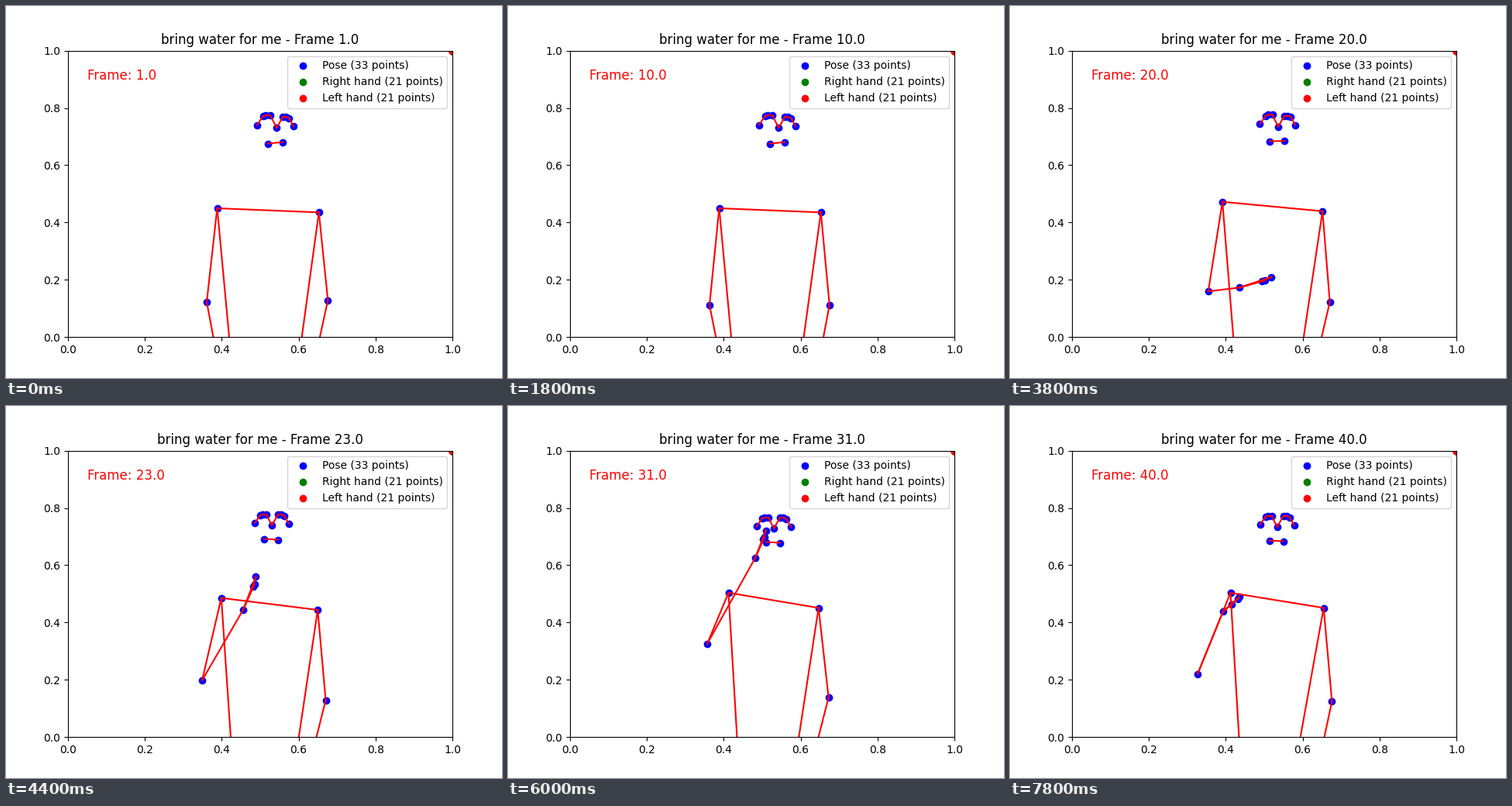
A matplotlib script that plays this animation: 640x480 px, repeating every 8000 ms.

```python
import numpy as np
import matplotlib.pyplot as plt
from matplotlib.animation import FuncAnimation

COUNT, STEP = 40, 200
LEFT, FLOOR, WIDTH, HEIGHT = 80, 427.2, 496, 369.6  # axes box in pixels

# Key points of the lifting arm, in pixels
KEYS = [1, 10, 17, 23, 31, 36, 40]
ELBOW = np.array([(259, 382), (260, 386), (259, 379), (253, 354),
                  (257, 307), (249, 342), (242, 346)], float)
WRIST = np.array([(276, 472), (277, 471), (286, 458), (306, 263),
                  (319, 196), (314, 228), (275, 265)], float)

# Ear, eye, nose, eye, ear and mouth corners, relative to the nose
FACE = np.array([(-22, -3), (-15, -13), (-12, -14), (-7, -14), (0, 0), (8, -14),
                 (12, -14), (16, -12.5), (22, -2), (-10, 17.5), (8, 18.5)])

# Point order: face 0-10, shoulders 11-12, elbows 13-14, right wrist 15,
# right fingers 16-18, left wrist 19, hips 20-21
LINKS = [(i, i + 1) for i in range(8)] + [
    (9, 10), (11, 12), (11, 13), (13, 15), (15, 16), (15, 17), (15, 18),
    (16, 17), (12, 14), (14, 19), (11, 20), (12, 21), (20, 21),
]


def ease(t, start, end):
    u = np.clip((t - start) / (end - start), 0, 1)
    return u * u * (3 - 2 * u)


def wave(t, start, period):
    return np.cos(2 * np.pi * (t - start) / period)


def follow(track, t):
    """Smooth curve through the key points."""
    slopes = np.gradient(track, KEYS, axis=0)
    i = min(np.searchsorted(KEYS, t, side="right") - 1, len(KEYS) - 2)
    gap = KEYS[i + 1] - KEYS[i]
    u = (t - KEYS[i]) / gap
    blend = ease(u, 0, 1)
    bend = gap * u * (1 - u) * (slopes[i] * (1 - u) - slopes[i + 1] * u)
    return track[i] + (track[i + 1] - track[i]) * blend + bend


def extend(joint, cross_x):
    """Continue a limb past the point where it crosses the floor."""
    return joint + 1.5 * (np.array([cross_x, FLOOR]) - joint)


def head(t):
    turn = 1 - ease(t, 17, 23)
    nose = np.array([343 + 6.2 * turn + 1.7 * ease(t, 30, 40),
                     154 + 3.2 * turn + 4 * ease(t, 23, 31) - 2 * ease(t, 31, 36)])
    stretch = np.where(FACE[:, :1] < 0, 1 + 0.16 * turn, 1)
    return nose + FACE * stretch


def fingers(t):
    """Pinky, index and thumb fanned out from the wrist."""
    curl = ease(t, 36, 40)
    angle = np.radians(-75 + 144 * ease(t, 17, 22) - 27 * curl - np.array([2, 0, 3]))
    reach = 42 + 4 * wave(t, 23, 16) - 18 * curl
    sizes = reach * np.array([0.7 + 0.2 * curl, 1, 0.78 - 0.25 * curl])
    return np.column_stack([sizes * np.cos(angle), -sizes * np.sin(angle)])


def pose(t):
    r_shoulder = np.array([272.5 + 12 * ease(t, 17, 30), 261 - 20 * ease(t, 12, 30)])
    l_shoulder = np.array([403.7 - 3 * ease(t, 17, 29) + 4 * ease(t, 31, 40),
                           266.3 - 5.8 * ease(t, 15, 30)])
    l_elbow = np.array([414 + 1.5 * wave(t, 4, 38), 381 + 5 * wave(t, 12, 37)])
    wrist = follow(WRIST, t)
    points = np.vstack([
        head(t), r_shoulder, l_shoulder, follow(ELBOW, t), l_elbow,
        wrist, wrist + fingers(t),
        extend(l_elbow, 403.5 + 3.7 * wave(t, 8, 38)),
        extend(r_shoulder, 288 + 7.5 * ease(t, 19, 31)),
        extend(l_shoulder, 381.7 - 7 * ease(t, 8, 36)),
    ])
    return np.column_stack([(points[:, 0] - LEFT) / WIDTH,
                            (FLOOR - points[:, 1]) / HEIGHT])


fig, ax = plt.subplots(figsize=(6.4, 4.8), dpi=100)
ax.set_xlim(0, 1)
ax.set_ylim(0, 1)
body = ax.scatter([], [], c="blue", label="Pose (33 points)")
corner = np.ones(21)
ax.scatter(corner, corner, c="green", label="Right hand (21 points)")
ax.scatter(corner, corner, c="red", label="Left hand (21 points)")
lines = [ax.plot([], [], "r-")[0] for _ in LINKS]
label = ax.text(0.05, 0.9, "", fontsize=12, color="red")
title = ax.set_title("")
ax.legend(loc="upper right")


def draw(frame):
    n = frame + 1.0
    points = pose(n)
    body.set_offsets(points)
    for line, link in zip(lines, LINKS):
        line.set_data(*points[list(link)].T)
    label.set_text(f"Frame: {n}")
    title.set_text(f"bring water for me - Frame {n}")
    return [body, *lines, label, title]


anim = FuncAnimation(fig, draw, frames=COUNT, interval=STEP,
                     repeat=True, repeat_delay=0, blit=False)
plt.show()
```
